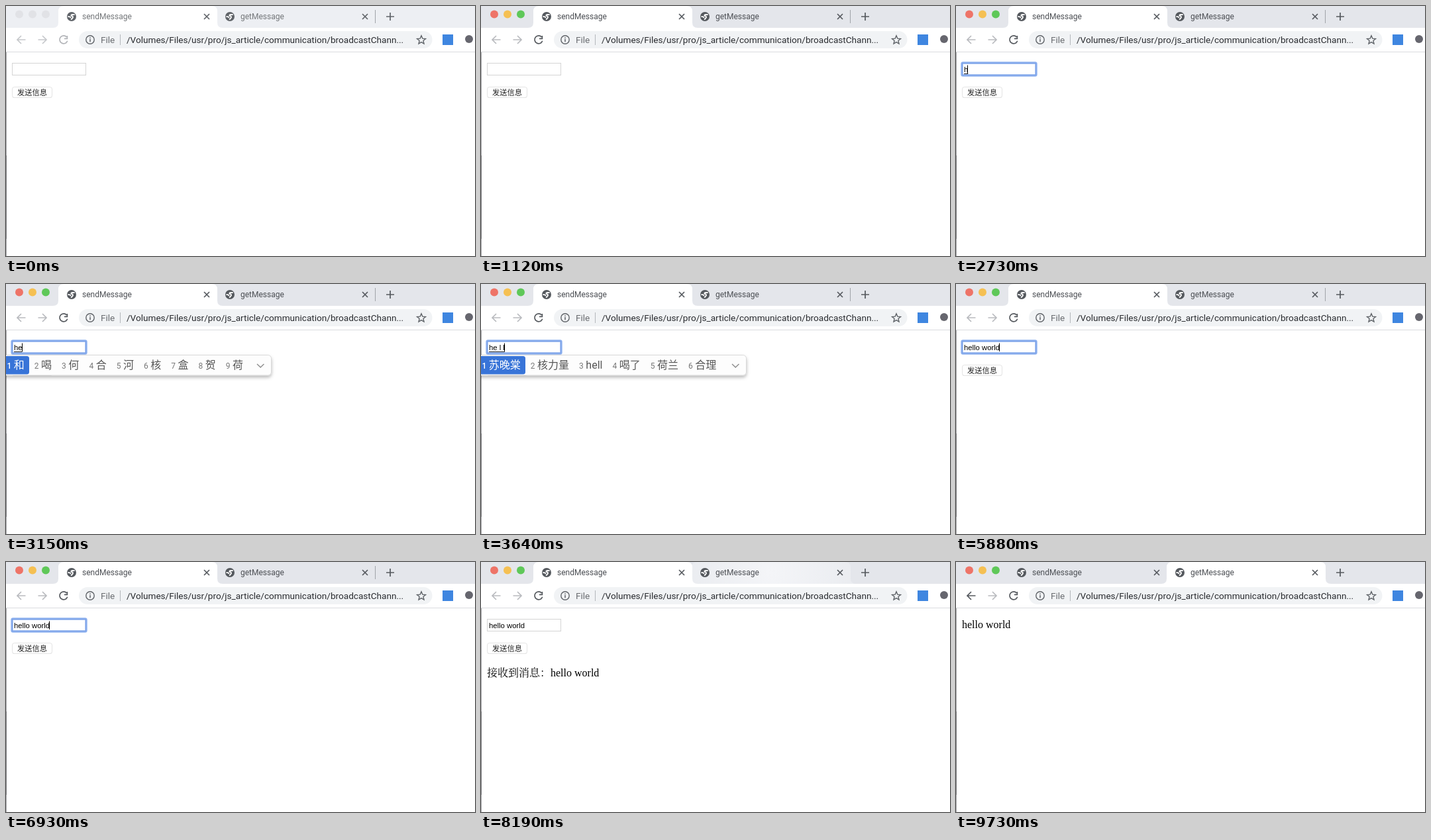
Write an HTML page that moves like this. It is 708 px wide and 378 px high and loops after 9.94 s.

```html
<!DOCTYPE html>
<html lang="zh-CN">
<head>
<meta charset="utf-8">
<title>BroadcastChannel</title>
<style>
html, body { margin: 0; width: 100%; height: 100%; overflow: hidden; background: #fff; }
svg { display: block; width: 708px; height: 378px; }
text { white-space: pre; font-family: Roboto, "Noto Sans CJK SC", "Noto Sans CJK", sans-serif; }
svg { --bar: #e4e6eb; --ink: #55595e; --title: #4b4e53; --dim: #b9bbbf; }
svg.idle { --bar: #edeff3; --ink: #606469; --title: #737679; --dim: #c6c8cb; }
.title { font-size: 12px; fill: var(--title); }
.line { fill: none; stroke: var(--ink); stroke-width: 1.7; }
.url { font-size: 13.58px; }
.field { font: 11.3px "Liberation Sans", Arial, sans-serif; }
.serif { font: 16px "Liberation Serif", "Noto Serif CJK SC", "Noto Sans CJK SC", "Noto Sans CJK", serif; }
.idle .light { fill: #e1e2e6; }
.idle #reload { stroke: #b2b4b8; }
#cands { font-size: 16px; fill: #565656; }
#cands .n { font-size: 12px; fill: #777; }
#cands .on, #cands .on .n { fill: #fff; }
#cands .on { font-weight: 500; }
</style>
</head>
<body>
<svg id="stage" viewBox="0 0 708 378" xmlns="http://www.w3.org/2000/svg">
  <defs>
    <g id="globe">
      <circle r="7" fill="var(--ink)"/>
      <path d="M4.6 -3L1.6 -3.2Q-.8 -3 -.6 -1.6Q0 -.8 1.6 -.4Q2.6 .6 1.6 1.8L-.8 4.6M-5.6 -.2L-2.6 .4L-1 1.8" fill="none" stroke="#fff" stroke-width="1.8"/>
    </g>
    <path id="cross" class="line" d="M-4 -4L4 4M4 -4L-4 4"/>
    <path id="tab" d="M-8 33q8 0 8-8V8q0-8 8-8H232q8 0 8 8V25q0 8 8 8z"/>
    <path id="arrow" d="M6.5 0H-6M0 -6L-6 0L0 6" fill="none" stroke-width="1.7"/>
    <radialGradient id="glow" gradientUnits="userSpaceOnUse" cx="120" cy="16" r="130">
      <stop offset="0" stop-color="#f4f5f8"/>
      <stop offset="1" stop-color="#eaecf0"/>
    </radialGradient>
    <filter id="shade" x="-10%" y="-30%" width="120%" height="190%">
      <feDropShadow dx="0" dy="3" stdDeviation="2.5" flood-opacity=".28"/>
    </filter>
    <filter id="soft"><feGaussianBlur stdDeviation=".6"/></filter>
  </defs>

  <rect width="708" height="378" fill="#fff"/>
  <rect width="708" height="33" fill="var(--bar)"/>
  <use id="hover" href="#tab" x="318" fill="url(#glow)"/>
  <use id="active" href="#tab" fill="#fff"/>

  <circle class="light" cx="20" cy="12.5" r="6" fill="#ee7468"/>
  <circle class="light" cx="40" cy="12.5" r="6" fill="#f5c053"/>
  <circle class="light" cx="60" cy="12.5" r="6" fill="#5fc859"/>

  <use href="#globe" x="99" y="16"/>
  <text class="title" x="115" y="20">sendMessage</text>
  <use href="#cross" x="303" y="16"/>
  <use href="#globe" x="338" y="16"/>
  <text class="title" x="354" y="20">getMessage</text>
  <use href="#cross" x="542" y="16"/>
  <path id="sep" d="M557.5 6V26" stroke="#a0a3a8"/>
  <path class="line" d="M574 16H586M580 10V22"/>

  <use id="back" href="#arrow" x="23" y="51"/>
  <use href="#arrow" transform="translate(55 51) scale(-1 1)" stroke="var(--dim)"/>
  <g id="reload" class="line">
    <path d="M91.6 47A6 6 0 1 0 92.7 52.8"/>
    <path d="M92.4 45V49.3H88"/>
  </g>
  <rect x="110" y="38" width="533.5" height="26" rx="13" fill="#f1f3f5"/>
  <circle cx="127" cy="51" r="6.2" fill="none" stroke="#5f6368" stroke-width="1.4"/>
  <path d="M127 50V54.3M127 47.4V48.9" stroke="#5f6368" stroke-width="1.5"/>
  <text class="url" x="143" y="56" fill="#6a6d71">File</text>
  <path d="M172.5 43V59" stroke="#b4b7bb"/>
  <text class="url" x="182" y="56" fill="#2a2c30">/Volumes/Files/usr/pro/js_article/communication/broadcastChann...</text>
  <path d="M627 44.8L628.8 49.1L633.5 49.5L629.9 52.5L631 57.1L627 54.6L623 57.1L624.1 52.5L620.5 49.5L625.2 49.1Z" fill="none" stroke="#5f6368" stroke-width="1.4"/>
  <rect x="659" y="43" width="16" height="16" fill="#3f86e0"/>
  <circle cx="699" cy="50" r="6" fill="#66666e"/>
  <path d="M0 69.5H708" stroke="#d9dbde"/>
  <path d="M.5 70V378" stroke="#a5a5a8"/>
  <path d="M.5 226V352" stroke="#77777b"/>

  <g id="sender">
    <rect x="9.5" y="86.5" width="111" height="18" fill="#fff" stroke="#d4d4d4"/>
    <g id="ring" fill="none">
      <rect x="9" y="86" width="112" height="19" rx="1.5" stroke="#8fb2f0" stroke-width="3.4" filter="url(#soft)"/>
      <rect x="9.5" y="86.5" width="111" height="18" stroke="#7ba1e6"/>
    </g>
    <text id="typed" class="field" x="12" y="100" xml:space="preserve"></text>
    <path id="under" stroke="#222"/>
    <path id="caret" stroke="#000"/>
    <rect x="9.5" y="123" width="60" height="16" rx="3.2" fill="#cfcfcf"/>
    <rect x="9.5" y="122.5" width="60" height="16" rx="3.2" fill="#fff" stroke="#e4e4e4"/>
    <text x="17" y="135" font-size="11.25" fill="#222">发送信息</text>
    <text id="note" class="serif" x="9" y="173">接收到消息：hello world</text>
    <g id="popup">
      <rect x="-5" y="107.5" width="405.5" height="30.5" rx="5" fill="#fdfdfd" stroke="#d2d2d2" stroke-width=".8" filter="url(#shade)"/>
      <rect id="pick" x="-5" y="109" height="27.5" rx="3.5" fill="#3874d8"/>
      <text id="cands" x="1.5" y="128"></text>
      <path d="M379 121L384.2 126L389.4 121" fill="none" stroke="#8a8a8a" stroke-width="1.3"/>
    </g>
  </g>
  <text id="receiver" class="serif" x="9" y="100">hello world</text>
</svg>

<script>
const LOOP = 9940, BLINK = 500;
const FOCUS = 1680, BLUR = 7000, SENT = 7140, SWITCH = 8540;

// time, field text, still composing
const keys = [
  [FOCUS, ''], [2730, 'h', 1], [3080, 'he', 1], [3360, 'he l', 1], [3640, 'he l l', 1],
  [3850, 'hell'], [4200, 'hello'], [4480, 'hello '], [4830, 'hello w'], [4970, 'hello wo'],
  [5180, 'hello wor'], [5390, 'hello worl'], [5670, 'hello world']
];
const lists = {
  'h': '和 好 会 还 后 很 号 或 话',
  'he': '和 喝 何 合 河 核 盒 贺 荷',
  'he l': '喝了 合理 荷兰 合力 河流 何来',
  'he l l': '苏晚棠 核力量 hell 喝了 荷兰 合理'
};

const $ = id => document.getElementById(id);
const show = (id, on) => { $(id).style.display = on ? '' : 'none'; };
let shown = null;

function setText(text, composing) {
  const id = text + '|' + composing;
  if (shown === id) return;
  shown = id;
  $('typed').textContent = text;
  const end = 12 + (text ? $('typed').getComputedTextLength() : 0);
  $('caret').setAttribute('d', `M${Math.round(end) - .5} 89.5V102`);
  $('under').setAttribute('d', `M12 102.5H${end}`);
  if (!composing) return;
  const words = lists[text].split(' ');
  $('pick').setAttribute('width', words[0].length * 16 + 24);
  $('cands').innerHTML = words.map((w, i) =>
    `<tspan${i ? '' : ' class="on"'}><tspan class="n" dx="${i ? 15 : 0}">${i + 1}</tspan><tspan dx="3.5">${w}</tspan></tspan>`
  ).join('');
}

function draw(t) {
  const second = t >= SWITCH;
  const focused = t >= FOCUS && t < BLUR;
  const [since, text, composing = 0] = keys.filter(k => k[0] <= t).pop() || [0, ''];

  show('sender', !second);
  show('receiver', second);
  $('stage').classList.toggle('idle', t < 1120);
  $('active').setAttribute('x', second ? 318 : 79);
  $('back').setAttribute('stroke', second ? '#55595e' : 'var(--dim)');
  $('hover').style.opacity = second ? 0 : Math.min(1, Math.max(0, (t - 7980) / 210));
  show('sep', t < 8050);

  if (!second) setText(text, composing);
  show('ring', focused);
  show('caret', focused && Math.floor((t - since) / BLINK) % 2 === 0);
  show('under', composing);
  show('popup', composing && t >= 2800);
  show('note', t >= SENT);
}

const start = performance.now();
function tick() {
  draw((performance.now() - start) % LOOP);
  requestAnimationFrame(tick);
}
tick();
</script>
</body>
</html>
```
